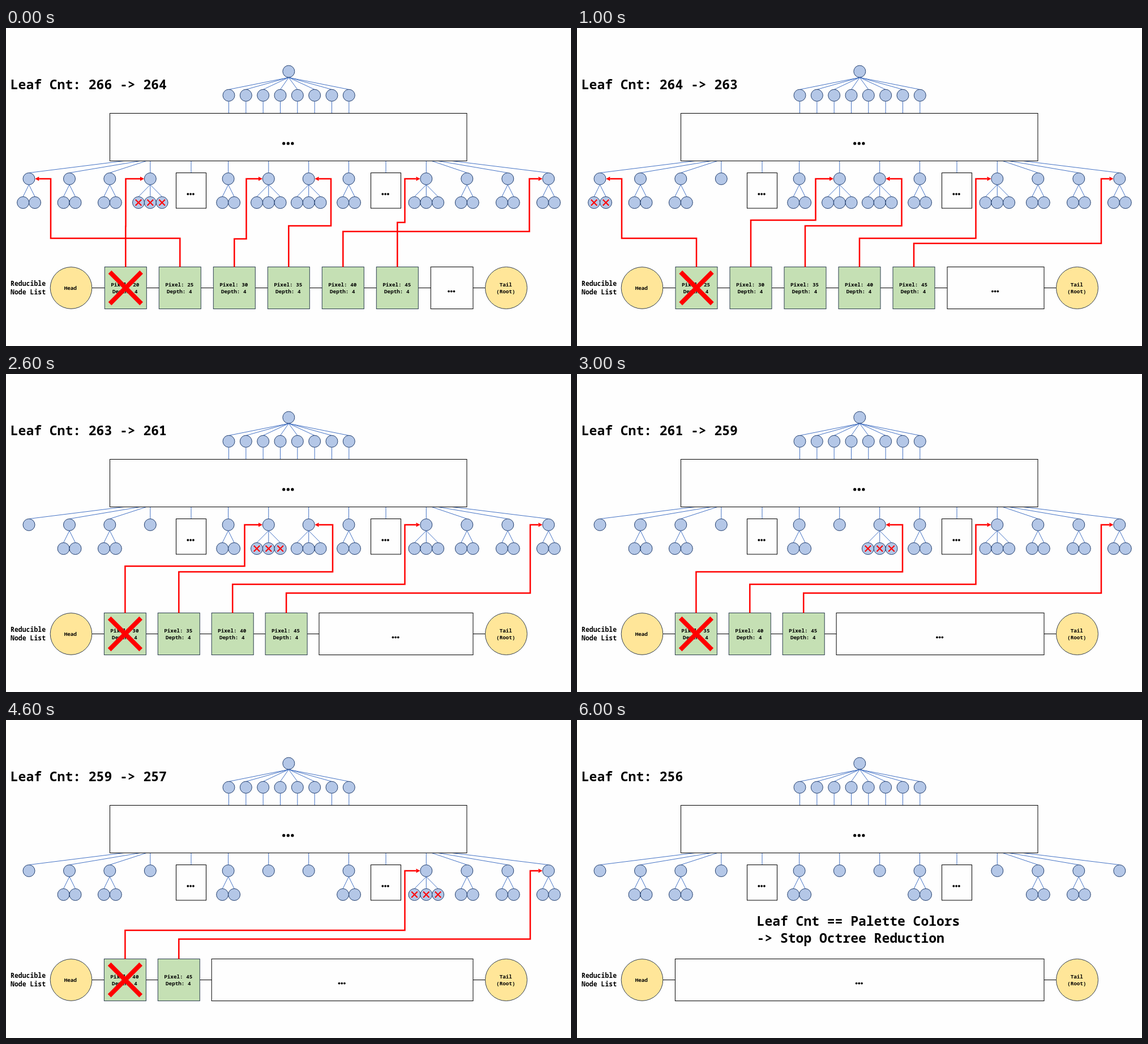
An HTML page for the animation above (7 s loop, 998 px wide and 561 px high).

```html
<!DOCTYPE html>
<html lang="en">
<head>
<meta charset="utf-8">
<title>Octree reduction</title>
<style>
  html, body { margin: 0; width: 100%; height: 100%; overflow: hidden; background: #fefefe; }
  svg { display: block; width: 998px; height: 561px; }
  text { font-family: "Noto Sans Mono", "DejaVu Sans Mono", monospace; font-weight: 700; fill: #000; white-space: pre; }
  .big { font-size: 23px; }
  .label { font-size: 11.5px; }
  .small { font-size: 9.3px; text-anchor: middle; }
  .node { fill: #b4c7e7; stroke: #24406f; }
  .end { fill: #ffe699; stroke: #333f50; }
  .item { fill: #c5e0b4; stroke: #2b3d4f; }
  .box { fill: #fefefe; stroke: #000; }
  .edge { fill: none; stroke: #4472c4; }
  .link { stroke: #000; }
  .route { fill: none; stroke: #f00; stroke-width: 2.5; }
  .tip { fill: #f00; }
  .cross { fill: none; stroke: #f00; }
</style>
</head>
<body>
<svg id="stage" viewBox="0 0 998 561" xmlns="http://www.w3.org/2000/svg"></svg>
<script>
const STEP = 1000;
const ROW = 266, LEAF = 308, R = 10.5;
const LIST = { top: 421.5, size: 74, mid: 458.5, right: 825 };

// Tree nodes: [x, number of leaves, x where the edge leaves the big box]
const nodes = [
  [40.5, 2, 208], [112, 2, 237], [183.3, 2, 248], [254.8, 3], [392.6, 2], [463.8, 3],
  [534.7, 3], [605.5, 2], [742.3, 3], [814.3, 2, 752], [886.3, 2, 763], [958.3, 2, 788]
];

// Each step: leaf counter, first pixel value, list start, pitch, routes [bend y, bend x, node]
const steps = [
  { count: "266 -> 264", pixel: 20, x: 174.3, pitch: 96, routes: [
    [350, 211.5, 3], [371, 79, 0], [372, 424.5, 5], [349, 574, 6], [359, 924.5, 11], [343, 704.5, 8]] },
  { count: "264 -> 263", pixel: 25, x: 174, pitch: 96, routes: [
    [371, 79, 0], [339, 421.5, 5], [349, 573.5, 6], [371, 704.5, 8], [380, 926, 11]] },
  { count: "263 -> 261", pixel: 30, routes: [
    [339, 421.5, 5], [349, 577, 6], [371, 704.5, 8], [386.5, 926, 11]] },
  { count: "261 -> 259", pixel: 35, routes: [
    [349, 575, 6], [371, 704.5, 8], [386.5, 926, 11]] },
  { count: "259 -> 257", pixel: 40, routes: [[371, 704.5, 8], [386.5, 926, 11]] },
  { count: "257 -> 256", pixel: 45, routes: [[386.5, 926, 11]] },
  { count: "256", routes: [] }
];

function add(parent, tag, attrs, text) {
  const el = document.createElementNS("http://www.w3.org/2000/svg", tag);
  for (const key in attrs) el.setAttribute(key, attrs[key]);
  if (text) el.textContent = text;
  return parent.appendChild(el);
}
const circle = (g, cx, cy, r, cls) => add(g, "circle", { cx, cy, r, class: cls });
const line = (g, x1, y1, x2, y2, cls) => add(g, "line", { x1, y1, x2, y2, class: cls });
const rect = (g, x, y, width, height, cls) => add(g, "rect", { x, y, width, height, class: cls });
const label = (g, x, y, text, cls) => add(g, "text", { x, y, class: cls }, text);

function dots(g, x, y, gap, r) {
  for (const k of [-1, 0, 1]) circle(g, x + k * gap, y, r);
}

function cross(g, x, y, half, width) {
  const d = `M${x - half} ${y - half}l${2 * half} ${2 * half}m0 ${-2 * half}l${-2 * half} ${2 * half}`;
  add(g, "path", { d, class: "cross", "stroke-width": width });
}

function leafXs([x, n]) {
  return n === 2 ? [x - 10.4, x + 10.5] : [x - 20.8, x, x + 20.8];
}

function drawLeaves(g, node, crossed) {
  const xs = leafXs(node);
  for (const x of xs) line(g, node[0], ROW + R, x, LEAF - R, "edge");
  for (const x of xs) circle(g, x, LEAF, R, "node");
  if (crossed) for (const x of xs) cross(g, x, LEAF, 5.3, 2);
}

function drawRoute(g, x, [y, bend, index]) {
  const target = nodes[index][0];
  const dir = Math.sign(target - bend);
  const tip = target - dir * (R + 0.3), base = tip - dir * 7;
  add(g, "path", { d: `M${x} ${LIST.top}V${y}H${bend}V${ROW}H${base}`, class: "route" });
  add(g, "path", { d: `M${tip} ${ROW}L${base} ${ROW - 3.7}V${ROW + 3.7}Z`, class: "tip" });
}

function drawBase(g) {
  const rootX = 499.3;
  for (let i = 0; i < 8; i++) {
    const x = 393.5 + i * 30.33;
    line(g, rootX, 87.3, x, 108.5, "edge");
    line(g, x, 129.5, x, 151, "edge");
    circle(g, x, 118.8, R, "node");
  }
  circle(g, rootX, 76.6, R, "node");

  for (const [x, , from = x] of nodes) {
    line(g, from, 234.5, x, ROW - R, "edge");
    circle(g, x, ROW, R, "node");
  }
  for (const x of [327, 671]) {
    line(g, x, 234.5, x, 256, "edge");
    rect(g, x - 26.5, 255.5, 53, 62.5, "box");
    dots(g, x - 0.9, 293, 4.8, 1.9);
  }
  rect(g, 183.5, 150.5, 630.5, 84, "box");
  dots(g, 498.3, 203.7, 7.6, 2.6);

  label(g, 8, 455, "Reducible", "label");
  label(g, 8, 470, "Node List", "label");
}

function drawStep(g, step, removed) {
  const { count, pixel, routes, x: start = 173.4, pitch = 94.9 } = step;
  const { top, size, mid, right } = LIST;
  const target = routes.length ? routes[0][2] : -1;

  label(g, 7.8, 108, "Leaf Cnt: " + count, "big");
  nodes.forEach((node, i) => {
    if (!removed.has(i)) drawLeaves(g, node, i === target);
  });

  line(g, 151, mid, 847, mid, "link");
  circle(g, 115, mid, 36.8, "end");
  label(g, 113.8, 462, "Head", "small");
  circle(g, 883.5, mid, 37, "end");
  label(g, 882.8, 456, "Tail", "small");
  label(g, 882.8, 468.2, "(Root)", "small");

  routes.forEach((route, i) => {
    const x = start + i * pitch, cx = x + size / 2;
    rect(g, x, top, size, size, "item");
    label(g, cx - 1, 456, "Pixel: " + (pixel + 5 * i), "small");
    label(g, cx - 1, 468.2, "Depth: 4", "small");
    drawRoute(g, cx, route);
    if (i === 0) cross(g, cx, mid, 27.8, 8);
  });

  const x = start + routes.length * pitch;
  rect(g, x, top, right - x, size, "box");
  dots(g, (x + right) / 2 - 0.9, 464.6, 4.7, 1.9);

  if (!routes.length) {
    label(g, 317.6, 363, "Leaf Cnt == Palette Colors", "big");
    label(g, 317.6, 393, "-> Stop Octree Reduction", "big");
  }
  removed.add(target);
}

const stage = document.getElementById("stage");
drawBase(add(stage, "g", {}));
const removed = new Set();
const groups = steps.map(step => {
  const g = add(stage, "g", { display: "none" });
  drawStep(g, step, removed);
  return g;
});

let shown = -1;
function tick() {
  const now = Math.floor(performance.now() / STEP) % steps.length;
  if (now !== shown) {
    groups.forEach((g, i) => g.setAttribute("display", i === now ? "inline" : "none"));
    shown = now;
  }
  requestAnimationFrame(tick);
}
tick();
</script>
</body>
</html>
```
